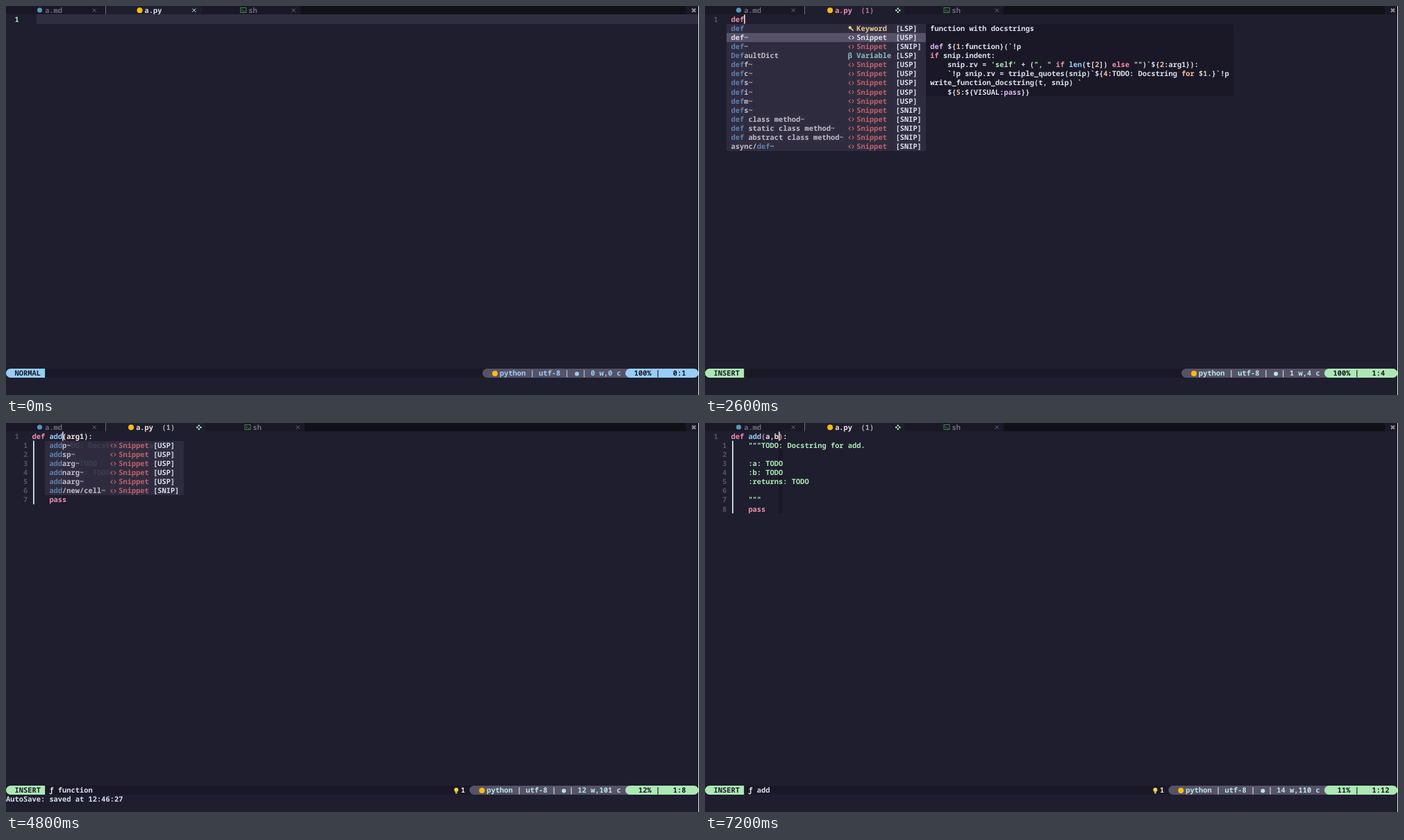
These frames come from a looping animation (998 by 561 pixels, 8000 ms). An HTML page with a canvas:

```html
<!DOCTYPE html>
<html lang="en">
<head>
<meta charset="utf-8">
<title>Editor session</title>
<style>
html, body { margin: 0; width: 100%; height: 100%; overflow: hidden; background: #1e1e2e; }
canvas { display: block; width: 998px; height: 561px; }
</style>
</head>
<body>
<canvas></canvas>
<script>
const W = 998, H = 561, LOOP = 8000;
const CELL = W / 160, ROW = 13.09;
const C = {
  base: '#1e1e2e', dark: '#1a1826', fill: '#101017', menu: '#302d41', raised: '#575268',
  gray: '#6e6c7e', soft: '#c3bac6', white: '#d9e0ee', rose: '#f5e0dc', red: '#f28fad',
  peach: '#f8bd96', green: '#abe9b3', teal: '#b5e8e0', blue: '#96cdfb', mauve: '#ddb6f2',
  match: '#5e81ac', python: '#ffbc03'
};
const MODES = {
  NORMAL: { pill: C.blue, text: C.blue },
  INSERT: { pill: C.green, text: C.teal },
  SELECT: { pill: C.mauve, text: C.mauve }
};
const KINDS = {
  F: ['Function', '#b48ead'], C: ['Class', '#fae3b0'], K: ['Keyword', '#ebcb8b'],
  V: ['Variable', '#8fbcbb'], S: ['Snippet', '#bf616a']
};
const SOURCES = { L: '[LSP]', U: '[USP]', N: '[SNIP]' };

// Menu entries: label:kind:source
const makeMenu = (col, width, kindWidth, prefix, entries, bar = false) =>
  ({ col, width, kindWidth, prefix, bar, items: entries.split('|').map(e => e.split(':')) });

const addEntries = 'addp~:S:U|addsp~:S:U|addarg~:S:U|addnarg~:S:U|addaarg~:S:U|add/new/cell~:S:N';
const menus = {
  d: makeMenu(6, 26, 8, 'd', 'delattr:F:L|dir:F:L|divmod:F:L|dict:C:L|def:K:L|del:K:L|DefaultDict:V:L|' +
    'Deque:V:L|Dict:V:L|DynamicClassAttribute:V:L|DeprecationWarning:C:L|def~:S:U|doc~:S:U|dol~:S:U|dcp~:S:U', true),
  de: makeMenu(6, 26, 8, 'de', 'delattr:F:L|def:K:L|del:K:L|DefaultDict:V:L|Deque:V:L|DeprecationWarning:C:L|' +
    'def~:S:U|def~:S:N|deff~:S:U|defc~:S:U|defs~:S:U|defi~:S:U|defm~:S:U|defs~:S:N|def class method~:S:N', true),
  def: makeMenu(6, 26, 8, 'def', 'def:K:L|def~:S:U|def~:S:N|DefaultDict:V:L|deff~:S:U|defc~:S:U|defs~:S:U|' +
    'defi~:S:U|defm~:S:U|defs~:S:N|def class method~:S:N|def static class method~:S:N|' +
    'def abstract class method~:S:N|async/def~:S:N'),
  ad: makeMenu(10, 13, 7, 'ad', addEntries),
  add: makeMenu(10, 13, 7, 'add', addEntries)
};
const info = [
  'function with docstrings', '', 'def ${1:function}(`!p', 'if snip.indent:',
  '    snip.rv = \'self\' + (", " if len(t[2]) else "")`${2:arg1}):',
  '    `!p snip.rv = triple_quotes(snip)`${4:TODO: Docstring for $1.}`!p',
  'write_function_docstring(t, snip) `', '    ${5:${VISUAL:pass}}'
];
const infoColors = { def: C.mauve, pass: C.mauve, if: C.red, else: C.red, for: C.peach, len: C.blue };

// Each entry changes some fields from its time on.
const timeline = [
  [0, { mode: 'NORMAL', typed: '', cursor: 0, caret: true, saved: true, line: true, level: '',
    menu: '', selected: -1, name: '', args: '', params: [], pick: 0, diag: '', bulb: false, hint: false,
    scope: '', message: '', guideFrom: 2 }],
  [400, { mode: 'INSERT' }],
  [500, { line: false }],
  [1000, { typed: 'd', cursor: 1, menu: 'd', saved: false }],
  [1100, { typed: 'de', cursor: 2 }],
  [1200, { menu: 'de' }],
  [1300, { typed: 'def', cursor: 3 }],
  [1500, { menu: 'def' }],
  [2000, { level: 'error', selected: 0 }],
  [2600, { selected: 1 }],
  [3100, { caret: false }],
  [3400, { mode: 'SELECT', name: 'function', args: 'arg1', params: ['arg1'], pick: 8, cursor: 11,
    caret: true, menu: '', selected: -1 }],
  [3500, { message: '12:46:27', saved: true, level: 'hint' }],
  [3600, { diag: 'arg1', bulb: true, hint: true, scope: 'function' }],
  [4000, { caret: false }],
  [4200, { mode: 'INSERT', name: 'a', pick: 0, cursor: 5, caret: true, saved: false, guideFrom: 3 }],
  [4400, { diag: '', bulb: false, guideFrom: 2 }],
  [4500, { name: 'ad', cursor: 6 }],
  [4600, { menu: 'ad' }],
  [4700, { name: 'add', cursor: 7 }],
  [4800, { menu: 'add' }],
  [5500, { mode: 'SELECT', menu: '', pick: 4, cursor: 11 }],
  [5600, { message: '12:46:29', saved: true }],
  [5700, { scope: 'add', diag: 'arg1', bulb: true }],
  [5900, { mode: 'INSERT', args: 'a', params: ['a'], pick: 0, cursor: 9, saved: false }],
  [6100, { diag: '', bulb: false }],
  [6400, { args: 'a,', cursor: 10 }],
  [6600, { message: '' }],
  [7100, { args: 'a,b', cursor: 11 }],
  [7200, { params: ['a', 'b'] }]
];
const stateAt = t => Object.assign({}, ...timeline.filter(([at]) => at <= t).map(([, change]) => change));

const canvas = document.querySelector('canvas');
const ctx = canvas.getContext('2d');
const scale = window.devicePixelRatio || 1;
canvas.width = W * scale;
canvas.height = H * scale;

const X = col => col * CELL;
const Y = row => row * ROW - 0.6;

function rect(x, y, w, h, color) {
  ctx.fillStyle = color;
  ctx.fillRect(x, y, w, h);
}
function cells(col, row, w, color, h = 1) {
  const x = Math.round(X(col)), y = Math.round(Y(row));
  rect(x, y, Math.round(X(col + w)) - x, Math.round(Y(row + h)) - y, color);
}
function put(col, row, text, color, back) {
  [...text].forEach((ch, i) => {
    if (ch === ' ') return;
    if (back) cells(col + i, row, 1, back);
    ctx.fillStyle = color;
    ctx.fillText(ch, X(col + i), Y(row) + 10.3);
  });
  return col + text.length;
}
function putParts(col, row, parts) {
  for (const [text, color] of parts) col = put(col, row, text, color);
}
function dot(x, y, r, color) {
  ctx.fillStyle = color;
  ctx.beginPath();
  ctx.arc(x, y, r, 0, 7);
  ctx.fill();
}
function stroke(color, width, ...paths) {
  ctx.strokeStyle = color;
  ctx.lineWidth = width;
  ctx.beginPath();
  for (const path of paths) path.forEach(([x, y], i) => i ? ctx.lineTo(x, y) : ctx.moveTo(x, y));
  ctx.stroke();
}
function cross(x, y, r, color, width) {
  stroke(color, width, [[x - r, y - r], [x + r, y + r]], [[x - r, y + r], [x + r, y - r]]);
}
function pill(from, to, color, radii) {
  ctx.fillStyle = color;
  ctx.beginPath();
  ctx.roundRect(X(from), 523, X(to) - X(from), 13, radii);
  ctx.fill();
}
function bulb(x, y, color, base) {
  dot(x, y - 1, 3, color);
  rect(x - 1.5, y + 1.5, 3, 3, base);
}
const underline = (col, row, w, color) => rect(X(col), Y(row) + 11.5, w * CELL, 1, color);

function drawTabs(s) {
  const shift = s.level ? 1 : 0;
  cells(0, 0, 160, C.fill);
  cells(0, 0, 68 + shift, C.dark);
  cells(23, 0, 22 + shift, C.base);
  cells(157, 0, 3, C.dark);

  dot(48.5, 6, 3.6, '#519aba');
  put(9, 0, 'a.md', C.gray);
  cross(127.3, 6.2, 2.5, C.gray, 1);
  rect(143, 0, 1, 12, C.gray);

  const nameCol = s.level ? 30 : 32;
  dot(X(nameCol) - 7, 6.2, 4, C.python);
  put(nameCol, 0, 'a.py', { error: C.red, hint: C.rose }[s.level] || C.white);
  if (s.level) put(36, 0, '(1)', s.level === 'error' ? '#b9718b' : '#b7aaae');
  const markX = X(43.5 + shift);
  if (s.saved) cross(markX - 0.5, 6.2, 2.5, C.white, 1);
  else for (const [dx, dy] of [[0, -2.5], [2.5, 0], [0, 2.5], [-2.5, 0]]) dot(markX + 0.3 + dx, 6.3 + dy, 1.3, C.green);

  const x = X(54 + shift);
  ctx.strokeStyle = '#428850';
  ctx.lineWidth = 1;
  ctx.strokeRect(x + 1, 2.5, 8, 7);
  stroke('#428850', 1, [[x + 2.8, 4.5], [x + 4.4, 6], [x + 2.8, 7.5]], [[x + 5, 7.6], [x + 7.5, 7.6]]);
  put(56 + shift, 0, 'sh', C.gray);
  cross(X(66.4 + shift), 6.2, 2.5, C.gray, 1);
  cross(990.5, 6.2, 2.5, '#8f8c9c', 2);
}

function bufferLines(s) {
  if (!s.name) return [s.typed];
  return [`def ${s.name}(${s.args}):`, `    """TODO: Docstring for ${s.name}.`, '',
    ...s.params.map(p => `    :${p}: TODO`), '    :returns: TODO', '', '    """', '    pass'];
}

function drawBuffer(s, lines) {
  const insert = s.mode === 'INSERT', cursorCol = 6 + s.cursor;
  if (s.line) cells(6, 1, 154, C.menu);
  if (lines.length > 1) cells(cursorCol, 2, 1, C.dark, lines.length - 1);
  put(2, 1, '1', insert ? C.raised : C.green);
  if (s.pick) cells(cursorCol - s.pick + 1, 1, s.pick, C.raised);

  if (s.name) {
    const bracket = s.menu ? C.rose : C.red;
    putParts(6, 1, [['def ', C.red], [s.name, C.blue], ['(', bracket], [s.args, C.rose], [')', bracket], [':', C.white]]);
  } else {
    put(6, 1, s.typed, s.level === 'error' ? C.red : C.white);
  }
  lines.slice(1).forEach((text, i) => {
    put(4, i + 2, String(i + 1), C.raised);
    put(6, i + 2, text, text.endsWith('pass') ? C.red : C.green);
  });
  if (lines.length > 1) {
    const top = Y(s.guideFrom);
    rect(39, top, 1.8, Y(lines.length + 1) - top, C.white);
  }
  if (s.diag) {
    const end = 6 + lines[0].length;
    rect(X(end + 5), Y(1) + 4, 6, 6, C.rose);
    put(end + 7, 1, `"${s.diag}" is not accessed`, C.rose);
    underline(11 + s.name.length, 1, s.args.length, C.rose);
    if (s.pick === 4) underline(11, 4, 4, C.green);
  }
  if (s.bulb) bulb(3, 18.5, C.white, C.white);

  if (!s.caret) return;
  if (insert) rect(X(cursorCol), Y(1), 1.6, ROW, C.rose);
  else if (s.line) cells(cursorCol, 1, 1, C.base);
  else {
    cells(cursorCol, 1, 1, C.rose);
    put(cursorCol, 1, lines[0][s.cursor], C.base);
    underline(cursorCol, 1, 1, C.base);
  }
}

function kindIcon(kind, col, row, color) {
  const x = X(col), y = Y(row) + 7;
  if (kind === 'F') put(col, row, 'ƒ', color);
  if (kind === 'V') put(col, row, 'β', color);
  if (kind === 'C') for (const [dx, dy] of [[3.2, -1.2], [1.4, 1.8], [5, 1.8]]) dot(x + dx, y + dy, 1.4, color);
  if (kind === 'K') {
    dot(x + 3, y - 1.5, 2.2, color);
    stroke(color, 1.6, [[x + 3, y - 1.5], [x + 8, y + 3]]);
  }
  if (kind === 'S') stroke(color, 1.1, [[x + 3.6, y - 2.5], [x + 1.2, y], [x + 3.6, y + 2.5]],
    [[x + 6, y - 2.5], [x + 8.4, y], [x + 6, y + 2.5]]);
}

function drawMenu(s) {
  const { col, width, kindWidth, prefix, items, bar } = menus[s.menu];
  const iconCol = col + width + 1, sourceCol = iconCol + kindWidth + 3, right = sourceCol + 7;
  ctx.globalAlpha = 0.9;
  cells(col - 1, 2, right - col + 1, C.menu, items.length);
  ctx.globalAlpha = 1;
  items.forEach(([label, kind, source], i) => {
    const row = i + 2, active = i === s.selected, back = active ? C.raised : C.menu;
    const [kindName, kindColor] = KINDS[kind], color = active ? C.white : kindColor;
    if (active) cells(col - 1, row, right - col + 1, back);
    put(col, row, label, active ? C.white : C.soft, back);
    const at = label.toLowerCase().indexOf(prefix);
    if (!active && at >= 0) put(col + at, row, label.substr(at, prefix.length), C.match, back);
    cells(iconCol, row, 1, back);
    kindIcon(kind, iconCol, row, color);
    put(iconCol + 2, row, kindName, color, back);
    put(sourceCol, row, SOURCES[source], C.white, back);
  });
  if (bar) {
    cells(right, 2, 1, C.raised, items.length);
    cells(right, 2, 1, C.gray, 6);
  }
}

function drawInfo() {
  cells(51, 2, 71, C.dark, info.length);
  info.forEach((text, i) => {
    const parts = i < 2 ? [text] : text.split(/('[^']*'|"[^"]*"|\b(?:def|pass|if|else|for|len)\b|\b\d)/);
    putParts(52, i + 2, parts.map(p =>
      [p, infoColors[p] || (/^['"]/.test(p) ? C.green : /^\d$/.test(p) ? C.peach : C.white)]));
  });
}

function drawStatus(s, lines) {
  const { pill: accent, text: tint } = MODES[s.mode];
  const body = lines.join('\n');
  const counted = s.pick ? lines[0].substr(s.cursor - s.pick + 1, s.pick) : body && body + '\n';
  const count = `${counted.split(/\s+/).filter(Boolean).length} w,${counted.length} c`;
  const start = 117 - count.length;

  cells(0, 40, 160, C.dark);
  pill(0, 9, accent, [6.5, 0, 0, 6.5]);
  put(2, 40, s.mode, C.dark);
  if (s.scope) put(10, 40, 'ƒ ' + s.scope, C.white);
  if (s.hint) {
    bulb(X(start - 4) + 6, 530, '#fdd835', '#b0a070');
    put(start - 2, 40, '1', C.rose);
  }
  pill(start, 145, C.raised, [6.5, 0, 0, 6.5]);
  dot(X(start + 2) + 5.5, 530, 4, C.python);
  put(start + 4, 40, 'python | utf-8 |', tint);
  dot(X(start + 21) + 5, 530.5, 3, tint);
  put(start + 23, 40, '| ' + count, tint);
  pill(143, 159.9, accent, 6.5);
  put(145, 40, (Math.floor(100 / lines.length) + '%').padStart(4) + ' |', C.dark);
  put(154, 40, `${body ? 1 : 0}:${s.cursor + 1}`, C.dark);
  if (s.message) put(0, 41, 'AutoSave: saved at ' + s.message, C.white);
}

function draw(now) {
  const s = stateAt(now % LOOP), lines = bufferLines(s);
  ctx.setTransform(scale, 0, 0, scale, 0, 0);
  ctx.font = 'bold 10.396px "Noto Sans Mono", "DejaVu Sans Mono", monospace';
  ctx.textRendering = 'geometricPrecision';
  rect(0, 0, W, H, C.base);
  drawTabs(s);
  drawBuffer(s, lines);
  if (s.menu) drawMenu(s);
  if (s.selected === 1) drawInfo();
  drawStatus(s, lines);
  rect(997, 0, 1, H, '#e6e6ea');
}

const began = performance.now();
function tick() {
  draw(performance.now() - began);
  requestAnimationFrame(tick);
}
tick();
</script>
</body>
</html>
```
